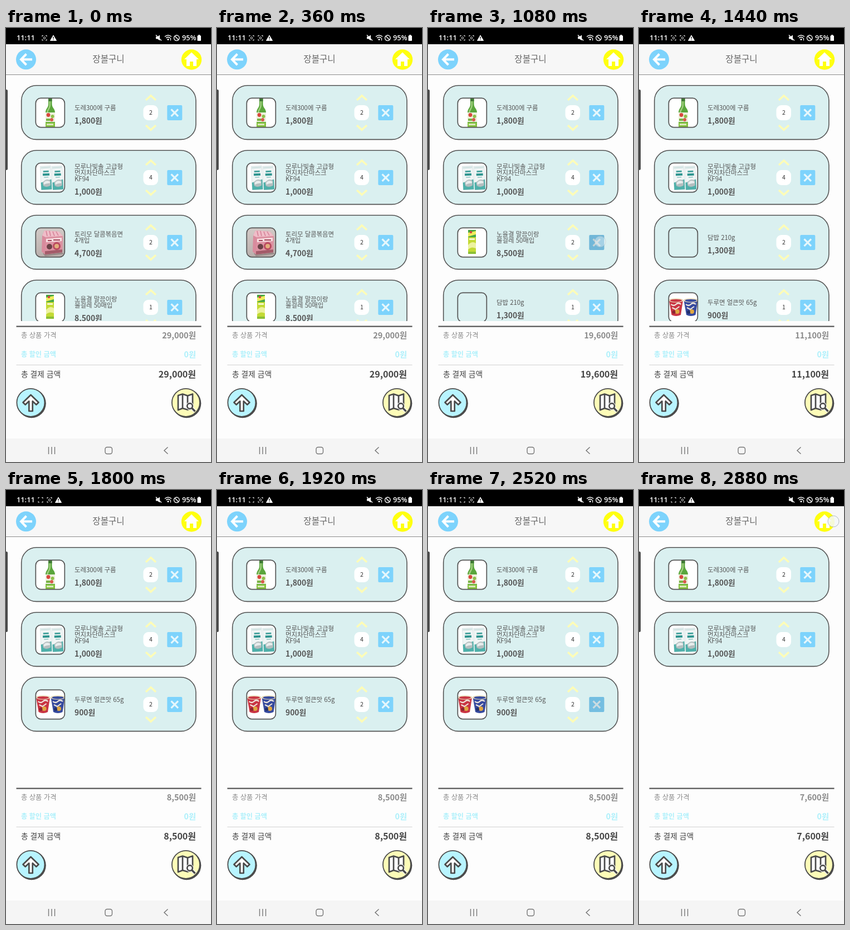
Write an HTML page that moves like this. It is 368 px wide and 776 px high and loops after 3 s.

```html
<!DOCTYPE html>
<html lang="ko">
<head>
<meta charset="utf-8">
<title>장볼구니</title>
<style>
html, body { margin: 0; width: 100%; height: 100%; overflow: hidden; background: #fdfdfd; }
svg { display: block; width: 100%; height: 100%; }
text { font-family: "Noto Sans CJK KR", "Noto Sans CJK", "Noto Sans", sans-serif; }
.status text { font-family: "Open Sans", "Noto Sans", sans-serif; }
</style>
</head>
<body>
<svg id="stage" viewBox="0 0 368 776" xmlns="http://www.w3.org/2000/svg">
  <defs>
    <clipPath id="list"><rect y="84" width="368" height="440"/></clipPath>
    <clipPath id="photo"><rect x="54" y="23.5" width="51" height="51.5" rx="8"/></clipPath>
    <linearGradient id="table" x2="0" y2="1">
      <stop stop-color="#d3cbc8"/><stop offset="1" stop-color="#b9aeab"/>
    </linearGradient>
  </defs>
  <rect width="368" height="776" fill="#fdfdfd"/>
  <g id="cart" clip-path="url(#list)"></g>
  <g id="chrome"></g>
  <g id="sums"></g>
  <g id="icons"></g>
  <circle id="dot" r="10" fill="#f4f8fa" stroke="#aab4b8"/>
</svg>
<script>
const LOOP = 3000, STEP = 120, INK = '#555', SKY = '#7dd3fc', PALE = '#fdfcb8';
const TAPS = [600, 1080, 1560, 2400];
const TOTALS = ['29,000', '19,600', '11,100', '8,500', '7,600'];
const COUNTS = [2, 4, 2, 1];
const $ = id => document.getElementById(id);

const rect = (x, y, w, h, fill, more = '') =>
  `<rect x="${x}" y="${y}" width="${w}" height="${h}" fill="${fill}" ${more}/>`;
const shape = (d, fill, more = '') => `<path d="${d}" fill="${fill}" ${more}/>`;
const line = (d, color, w, more = '') =>
  shape(d, 'none', `stroke="${color}" stroke-width="${w}" ${more}`);
const circle = (x, y, r, fill, more = '') =>
  `<circle cx="${x}" cy="${y}" r="${r}" fill="${fill}" ${more}/>`;
// y is the middle of the line of text
const label = (s, x, y, size, color, weight = 400, anchor = 'start') =>
  `<text x="${x}" y="${y + size * 0.36}" font-size="${size}" fill="${color}" ` +
  `font-weight="${weight}" text-anchor="${anchor}">${s}</text>`;

function bottle() {
  return shape('M76 23H82.5V34C82.5 41 88 42 88 49V76H71V49C71 42 76 41 76 34Z', '#5aa63c') +
    shape('M77.5 26V35C77.5 42 73 44 73 49H75.5C76 44 80 42 80 35V26Z', '#a3cf82') +
    rect(76, 23, 6.5, 6, '#3f7a34') +
    rect(71, 49, 17, 17, '#edf1dc') + circle(76, 53.5, 3.4, '#d8473d') +
    circle(83.5, 56, 3, '#8fc04a') + circle(82, 62, 3, '#d8574a') +
    rect(72, 60, 7, 4, '#79b345') + rect(71, 67, 17, 9, '#86c23f') +
    rect(73, 69, 12, 3, '#dce8bd');
}

function masks() {
  const pouch = (x, turn) => `<g transform="translate(${x} 29) rotate(${turn} 9 21)">` +
    rect(0, 0, 19, 42, '#f0f5f5', 'stroke="#cddcdc" stroke-width=".6"') +
    rect(1, 1, 17, 3, '#d3e4e3') + rect(5, 8, 10, 3, '#4aa5a0') +
    rect(4, 13, 12, 4, '#2f9590') + rect(6, 19, 8, 1.5, '#8cc4c1') +
    shape('M0 29L19 24V42H0Z', '#4fb0aa') +
    shape('M3 29Q10 21 17 26V35Q10 39 4 35Z', '#b4bebf') +
    shape('M5 29Q10 24 16 28V31Q10 30 5 33Z', '#e8eded') + '</g>';
  return pouch(62.3, -3) + pouch(83, -3);
}

function noodles() {
  return rect(53, 22, 53, 54, 'url(#table)') +
    shape('M66 69L99 66L104 70L70 74Z', '#978986') +
    shape('M69 28L95 30L102 38L101 67L70 71L64 66L65 37Z', '#d98b9d') +
    shape('M69 28L95 30L102 38L71 40L65 37Z', '#efbdc8') +
    line('M72 29L74 38M78 29L80 38M84 30L87 38M90 30L94 37', '#d47f95', 1.5) +
    shape('M71 40L102 38L101 67L70 71Z', '#dc92a2') +
    shape('M72 43L100 41V47L72 49Z', '#f7dfe2') +
    line('M75 46H82M85 45H97', '#a34558', 2) +
    circle(78, 57, 5, '#6b4247') + circle(91, 56, 7, '#b94a5f') +
    circle(91, 56, 4, '#e3ad7d') + shape('M70 65L101 62V67L70 71Z', '#a35b69');
}

function wipes() {
  return rect(72, 27, 14, 43, '#c3da35') + rect(72, 27, 14, 13, '#46a845') +
    shape('M72 32L86 29V35L72 39Z', '#f0ec5c') + circle(77, 31, 2.2, '#d4473e') +
    shape('M72 54Q79 46 86 51V60Q78 56 72 62Z', '#edf2a0') +
    rect(74, 42, 10, 3, '#f6f7cf') + rect(72, 66, 14, 4, '#8cbf36');
}

function cups() {
  const cup = (x, main, dark) => `<g transform="translate(${x} 33)">` +
    shape('M0.5 4H25.5L21.5 30Q13 34 5 30Z', main) +
    `<ellipse cx="13" cy="4" rx="13" ry="3.8" fill="#eadcba"/>` +
    `<ellipse cx="13" cy="4.3" rx="10.5" ry="2.4" fill="${main}"/>` +
    line('M4 11Q9 15 13 11T22 11', '#f0e7dd', 2.2) +
    line('M6 17L12 20L19 15', '#f0e7dd', 2) +
    circle(15, 24, 4, '#e0a742') + circle(9, 25, 3, dark) + '</g>';
  return cup(53.5, '#c93543', '#8c2430') + cup(80, '#364a9e', '#222f6b');
}

const ITEMS = [
  { name: ['도레300에 구름'], price: '1,800', art: bottle },
  { name: ['모루나빛솔 고급형', '먼지차단마스크', 'KF94'], price: '1,000', art: masks },
  { name: ['토리모 달콤볶음면', '4개입'], price: '4,700', art: noodles },
  { name: ['노을결 말끔이랑', '물걸레 50매입'], price: '8,500', art: wipes },
  { name: ['담밥 210g'], price: '1,300' },
  { name: ['두루면 얼큰맛 65g'], price: '900', art: cups }
];

function card(item, slot, dim) {
  const n = item.name.length, first = 46 - n * 5.4;
  const chevron = (y, dir) => line(`M251 ${y + dir * 4}L260 ${y - dir * 4}L269 ${y + dir * 4}`, PALE, 3.6);
  return `<g transform="translate(0 ${102 + slot * 116})">` +
    rect(27.7, 0.8, 313.2, 96.6, '#daf0f0', `rx="27" stroke="${INK}" stroke-width="1.6"`) +
    (item.art ? rect(53, 23.5, 52, 52, '#fff', 'rx="9"') +
      `<g clip-path="url(#photo)">${item.art()}</g>` : '') +
    rect(53.3, 23.4, 52, 52.2, 'none', `rx="9" stroke="${INK}" stroke-width="1.7"`) +
    item.name.map((s, i) => label(s, 123, first + i * 10.9, 11.4, '#555')).join('') +
    label(item.price + '원', 123, 58.7 + n * 5.4, 13.8, '#555', 700) +
    chevron(23, 1) + chevron(76, -1) +
    rect(246.5, 36, 26.5, 27, '#fff', 'rx="9"') +
    label(COUNTS[slot], 259.8, 49.5, 10.5, '#333', 400, 'middle') +
    rect(289.3, 36, 27, 27, SKY, 'rx="2"') +
    line('M296.5 43.3L309 55.8M309 43.3L296.5 55.8', '#e6f7fc', 3.2) +
    (dim ? rect(289.3, 36, 27, 27, '#4b6068', `rx="2" opacity="${dim}"`) : '') + '</g>';
}

function scan(x, filled) {
  return line(`M${x - 4} 15.5V13.5H${x - 2}M${x + 2} 13.5H${x + 4}V15.5M${x + 4} 20V22H${x + 2}M${x - 2} 22H${x - 4}V20`, '#ddd', 1.1) +
    (filled ? circle(x, 17.8, 1.8, 'none', 'stroke="#ddd"') : '');
}

function warning(x) {
  return shape(`M${x} 13L${x + 5.5} 22.5H${x - 5.5}Z`, '#fff', 'stroke="#fff" stroke-linejoin="round"') +
    line(`M${x} 15.5V19M${x} 20.2V21.6`, '#000', 1.3);
}

function statusBar() {
  return '<g class="status">' + rect(0, 0, 368, 29, '#000') +
    label('11:11', 19, 17.5, 12.8, '#fff', 600) +
    shape('M269 15.5H272L276 12.5V22.5L272 19.5H269Z', '#fff') +
    line('M269 12.5L279 22.5', '#fff', 1.4) +
    line('M285 15.5Q291 10.5 297 15.5M287.3 18Q291 14.8 294.7 18', '#fff', 1.5) +
    circle(291, 20.5, 1.5, '#fff') + line('M295.5 18V22.5', '#fff', 1.2) +
    circle(306.3, 17.8, 4.8, 'none', 'stroke="#fff" stroke-width="1.4"') +
    line('M303 14.5L309.6 21.1', '#fff', 1.4) +
    label('95%', 316, 17.5, 12.8, '#fff', 600) +
    rect(343.5, 13.5, 6.5, 9.5, '#fff', 'rx="1"') + rect(345.2, 12.2, 3, 2, '#fff') + '</g>';
}

function chrome() {
  const round = (x, fill) => circle(x + 0.8, 671.2, 26, '#4c4c4c') +
    circle(x - 0.6, 669.8, 25, fill, 'stroke="#4c4c4c" stroke-width="1.8"');
  const ink = 'stroke="#4a4a4a" stroke-width="2.7" stroke-linejoin="round"';
  return statusBar() +
    rect(0, 29, 368, 54, '#f7f7f7') + rect(0, 83, 368, 1, '#8d8d8d') +
    label('장볼구니', 184, 55.5, 15.6, '#666', 300, 'middle') +
    circle(36, 56.3, 18, SKY) + line('M36.5 46.5L27 56.3L36.5 66M28 56.3H47', '#fff', 4) +
    circle(333, 56.5, 18.2, '#ffff10') +
    shape('M333 43.5L346 56H342V68H336V60H330V68H324V56H320Z', '#fff') +
    rect(-4, 110, 7, 144, '#484848', 'rx="2.5"') +
    rect(18.5, 532.5, 332, 2.2, INK) + rect(18.5, 602, 332, 1, '#d2d2d2') +
    label('총 상품 가격', 27, 550, 12.3, '#8a8a8a') +
    label('총 할인 금액', 27, 584, 12.2, '#adf0fb', 700) +
    label('0원', 341, 584, 14.2, '#adf0fb', 700, 'end') +
    label('총 결제 금액', 27, 619.5, 13.8, '#444') +
    round(45, '#b8f4ff') +
    shape('M44.5 656L58.5 669.5L54.3 673.5L47.7 667.3V685H41.3V667.3L34.7 673.5L30.5 669.5Z', '#fff', ink) +
    round(323.5, PALE) +
    shape('M309 657L317 654.5L326 657.5L335 654.5V680L326 682.5L317 680L309 683Z', '#fff', ink) +
    line('M317 655V680M326 658V680', '#4a4a4a', 2.7) +
    circle(330, 676, 7, '#fff') + line('M332 678L339.5 685.5', '#fff', 6) +
    circle(330, 676, 4.8, '#fff', ink) + line('M333.5 679.5L339.5 685.5', '#4a4a4a', 3.4) +
    rect(0, 734, 368, 42, '#f5f5f5') +
    line('M76.5 749V762M82 749V762M87.5 749V762', '#777', 1.4) +
    rect(178, 749.5, 12.5, 12, 'none', 'rx="3.5" stroke="#777" stroke-width="1.4"') +
    line('M290.5 749.5L284 755.5L290.5 761.5', '#777', 1.5);
}

let shown = -1;
function render(time) {
  const t = Math.floor((time % LOOP) / STEP) * STEP;
  if (t === shown) return;
  shown = t;

  const stage = TAPS.filter(tap => t >= tap + 240).length;
  const since = stage < TAPS.length ? t - TAPS[stage] : -1;
  const dim = since < 0 ? 0 : since < STEP ? 0.24 : stage ? 0.18 : 0.08;
  const rows = ITEMS.slice(0, 2).concat(ITEMS.slice(2 + stage, 4 + stage));
  $('cart').innerHTML = rows.map((item, i) => card(item, i, i === 2 ? dim : 0)).join('');

  const total = TOTALS[stage] + '원';
  $('sums').innerHTML = label(total, 341, 550, 14.5, '#8a8a8a', 700, 'end') +
    label(total, 341, 619.5, 16, '#444', 700, 'end');

  $('icons').innerHTML = t < 240 ? scan(69, true) + warning(85)
    : scan(62, t < 1680) + scan(78, true) + warning(94);

  const home = t >= 2880, touch = since >= 0 && since < STEP;
  const dot = $('dot');
  dot.setAttribute('cx', home ? 349 : 309);
  dot.setAttribute('cy', home ? 56 : 382);
  dot.setAttribute('opacity', home ? 0.85 : touch ? 0.4 : 0);
}

$('chrome').innerHTML = chrome();
const start = performance.now();
function tick() {
  render(performance.now() - start);
  requestAnimationFrame(tick);
}
tick();
</script>
</body>
</html>
```
